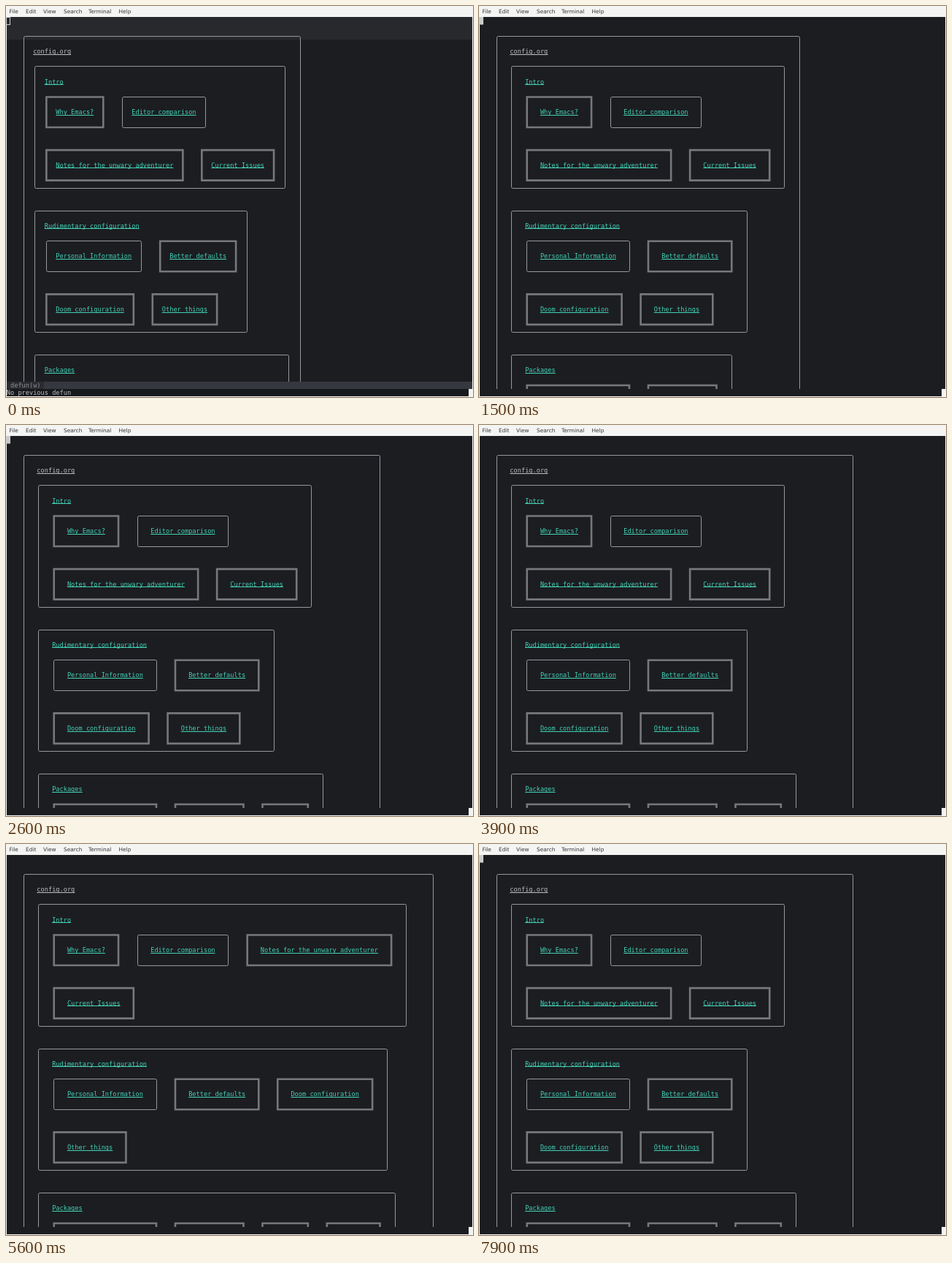
An HTML page with a canvas for the animation above (8 s loop, 640 by 535 pixels).

```html
<!DOCTYPE html>
<html lang="en">
<head>
<meta charset="utf-8">
<title>Boxed headlines</title>
<style>
html, body { margin: 0; width: 100%; height: 100%; overflow: hidden; background: #f4f4f2; }
canvas { display: block; }
</style>
</head>
<body>
<canvas id="stage" width="640" height="535"></canvas>
<script>
const ctx = document.getElementById('stage').getContext('2d');
const LOOP = 8000;
const CW = 5.195, CH = 10.38, X0 = 0.8, Y0 = 15.5;
const BG = '#1c1d21', LINE = '#97989a', DOUBLE = '#77787b', LINK = '#42d2b6', FG = '#bdbec0';
const BOTTOM = 524;

const MENU = [['File', 4.5], ['Edit', 27], ['View', 51], ['Search', 79], ['Terminal', 113], ['Help', 154.5]];

// A leading '-' marks a leaf without hidden children.
const GROUPS = [
  ['Intro', ['Why Emacs?', '-Editor comparison', 'Notes for the unwary adventurer', 'Current Issues']],
  ['Rudimentary configuration', ['-Personal Information', 'Better defaults', 'Doom configuration', 'Other things']],
  ['Packages', ['Package installation', 'Convenience', 'Tools', 'Visuals']]
];

// [start ms, padding, flex width, widest line below the fold]
const LAYOUTS = [
  [0, 2, 62, 0],
  [600, 3, 55, 0],
  [1300, 3, 58, 58],
  [1400, 3, 62, 62],
  [1500, 3, 65, 0],
  [1700, 3, 68, 0],
  [2100, 3, 71, 71],
  [2600, 3, 79, 79],
  [4100, 3, 84, 0],
  [4200, 3, 87, 0],
  [4300, 3, 90, 0],
  [4700, 3, 93, 93],
  [6500, 3, 90, 0],
  [7000, 3, 87, 0],
  [7300, 3, 79, 79],
  [7500, 3, 71, 71],
  [7600, 3, 68, 0],
  [7700, 3, 55, 0],
  [7900, 3, 79, 79]
];

const CURSOR_OFF = [[3900, 4500], [5600, 6000]];

const midX = col => X0 + (col + 0.5) * CW;
const midY = row => Y0 + (row + 0.5) * CH;

function fill(color, x, y, w, h) {
  ctx.fillStyle = color;
  ctx.fillRect(x, y, w, h);
}

function text(str, col, y, color) {
  ctx.font = '8.63px "DejaVu Sans Mono", monospace';
  ctx.fillStyle = color;
  [...str].forEach((ch, i) => ctx.fillText(ch, X0 + (col + i) * CW, y));
}

function link(str, col, row, color) {
  const y = midY(row);
  text(str, col, y + 2.8, color);
  fill(color, X0 + col * CW, Math.floor(y + 4), str.length * CW, 1);
}

function box(left, top, right, bottom, doubled) {
  let x = midX(left), y = midY(top), x2 = midX(right), y2 = midY(bottom);
  if (!doubled) [x, y, x2, y2] = [x, y, x2, y2].map(v => Math.floor(v) + 0.5);
  ctx.strokeStyle = doubled ? DOUBLE : LINE;
  ctx.lineWidth = doubled ? 2.6 : 1;
  ctx.beginPath();
  ctx.roundRect(x, y, x2 - x, y2 - y, doubled ? 0 : 2);
  ctx.stroke();
}

// Draws one group with wrapped leaves and returns its right and bottom cells.
function group([title, leaves], left, top, pad, flex) {
  const start = left + pad + 1;
  let col = start, row = top + 4, edge = start + title.length;
  link(title, start, top + 2, LINK);
  for (const leaf of leaves) {
    const doubled = leaf[0] !== '-';
    const label = doubled ? leaf : leaf.slice(1);
    const span = label.length + 2 * pad + 1;
    if (col > start && col + span - start + 1 > flex) {
      col = start;
      row += 7;
    }
    box(col, row, col + span, row + 4, doubled);
    link(label, col + pad + 1, row + 2, LINK);
    edge = Math.max(edge, col + span);
    col += span + 5;
  }
  const right = edge + pad + 1, bottom = row + 5;
  box(left, top, right, bottom);
  return { right, bottom };
}

function diagram([, pad, flex, low]) {
  const left = 4, inner = left + pad + 1;
  let top = 6, edge = low ? inner + low + 2 * pad + 1 : 0;
  link('config.org', inner, 4, FG);
  for (const g of GROUPS) {
    const { right, bottom } = group(g, inner, top, pad, flex);
    edge = Math.max(edge, right);
    top = bottom + 3;
  }
  box(left, 2, edge + pad + 1, 70);
}

function menuBar() {
  ctx.font = '7.4px "DejaVu Sans", sans-serif';
  ctx.fillStyle = '#33363a';
  for (const [label, x] of MENU) ctx.fillText(label, x, 9.8);
}

function draw(t) {
  const idle = t < 400;
  fill('#f4f4f2', 0, 0, 640, 535);
  menuBar();
  fill(BG, 1, 15, 638, 519);
  if (idle) fill('#27292d', 1, 15, 638, 31);

  ctx.save();
  ctx.beginPath();
  ctx.rect(1, 15, 638, (idle ? 514 : BOTTOM) - 15);
  ctx.clip();
  diagram(LAYOUTS.findLast(l => l[0] <= t));
  ctx.restore();

  if (idle) {
    fill('#36383f', 1, 514, 638, 10);
    fill('#292b30', 1, 514, 51, 10);
    text('defun(w)', 1, 521.9, '#8d8f92');
    ctx.strokeStyle = '#cfcfcf';
    ctx.lineWidth = 1;
    ctx.strokeRect(0.5, 15.5, 5, 10);
  } else if (!CURSOR_OFF.some(([a, b]) => t >= a && t < b)) {
    fill('#cbcbcb', 0, 15, 6, 10.5);
  }
  if (t < 600) {
    fill('#18191c', 1, BOTTOM, 638, 10);
    text('No previous defun', 0, 532.2, FG);
  }
  fill('#f4f4f2', 634, BOTTOM, 6, 10);
}

function tick() {
  draw(performance.now() % LOOP);
  requestAnimationFrame(tick);
}
tick();
</script>
</body>
</html>
```
